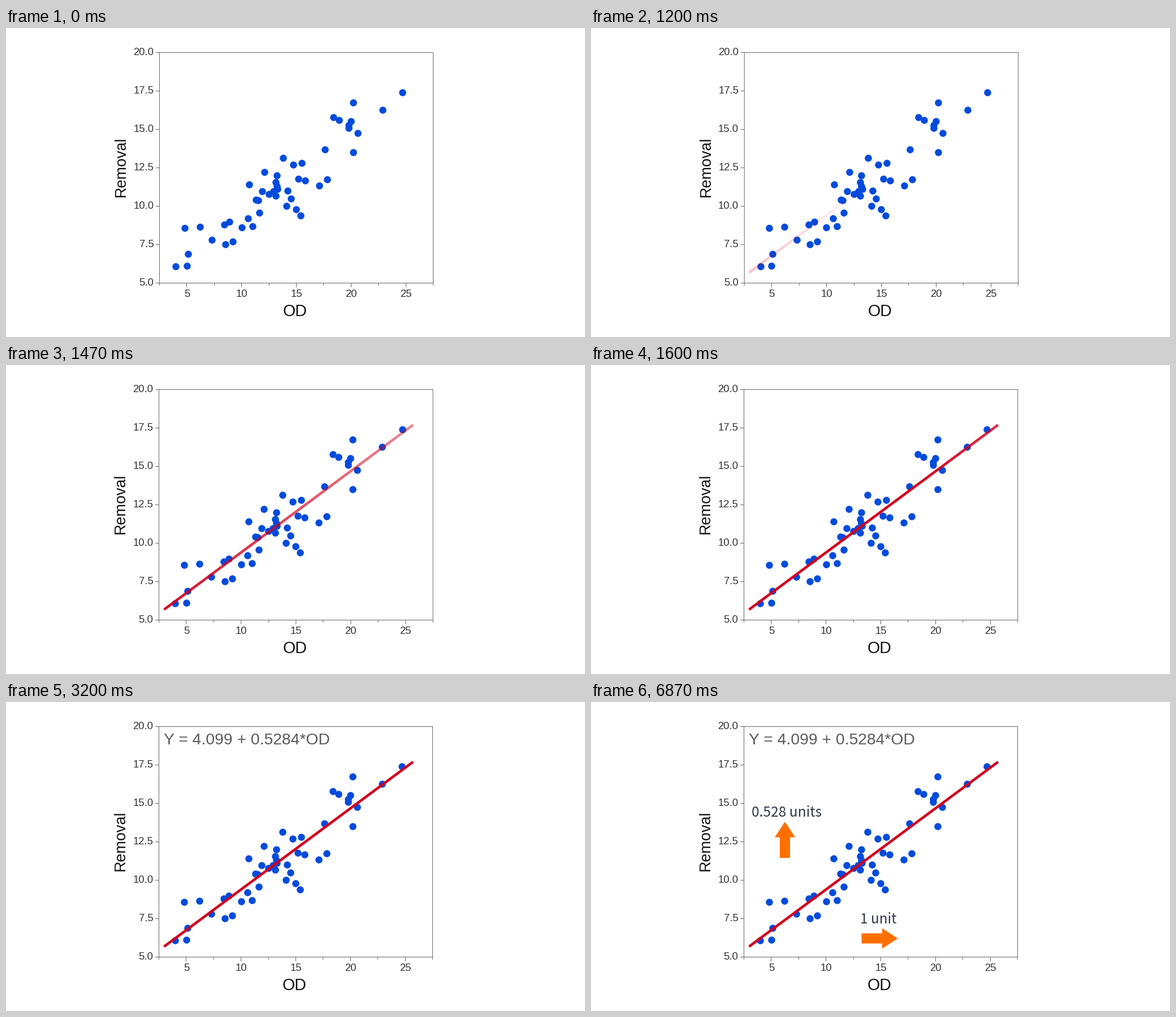
Write a matplotlib script that moves like this. It is 1024 by 547 pixels and loops after 8000 ms.

```python
import numpy as np
import matplotlib.pyplot as plt
from matplotlib.animation import FuncAnimation
from matplotlib.collections import LineCollection
from matplotlib.patches import Polygon

W, H, DPI = 1024, 547, 100
LOOP, STEP = 8000, 20
PT = 72 / DPI  # points per pixel

BLUE, RED, ORANGE = "#004bdc", "#d1021f", "#ff6f00"
LEFT, RIGHT, TOP, BOTTOM = 271.5, 755.5, 43.5, 451.5

# Dot centres in pixels
DOTS = np.array([
    (300, 421.5), (319.5, 421), (321.5, 399.5), (315.5, 353.5), (342.5, 352),
    (364, 374.5), (385.5, 348), (395, 342.5), (387.5, 382.5), (400.5, 378),
    (416.5, 352.5), (435.5, 351), (428, 336.5), (447.5, 326.5), (442, 304),
    (445.5, 304.5), (430, 277), (457, 254.5), (453, 289), (465, 293.5),
    (473, 288.5), (476.5, 297), (476.5, 273), (478.5, 280), (480, 285),
    (478.5, 260.5), (490, 230), (507.5, 242), (523, 239), (517, 267),
    (529, 269.5), (498, 288), (503.5, 301.5), (496, 315), (513, 320.5),
    (521, 332), (554, 278.5), (567.5, 268), (563.5, 215), (579, 157.5),
    (589, 163), (610, 165), (606, 172), (606, 176.5), (614, 132),
    (614, 219.5), (622, 186), (666, 145), (701, 114),
])

fig = plt.figure(figsize=(W / DPI, H / DPI), dpi=DPI, facecolor="white")
ax = fig.add_axes([0, 0, 1, 1])
ax.axis("off")


def px(value):
    return 271.5 + (value - 2.5) * 19.36


def py(value):
    return BOTTOM - (value - 5) * 27.2


def label(x, y, s, size, color="#333333", ha="center", font="Liberation Sans", **kw):
    return ax.text(x, y, s, fontsize=size * PT, color=color, ha=ha,
                   va="baseline", family=font, **kw)


# Plot box, ticks and labels
lines = [
    [(LEFT - 0.5, TOP), (RIGHT + 0.5, TOP)],
    [(LEFT - 0.5, BOTTOM), (RIGHT + 0.5, BOTTOM)],
    [(LEFT, TOP), (LEFT, BOTTOM)],
    [(RIGHT, TOP), (RIGHT, BOTTOM)],
]
texts = []
for k in range(7):
    value = 5 + 2.5 * k
    y = py(value)
    lines.append([(LEFT - 6.5, y), (LEFT, y)])
    texts.append(label(261.5, y + 5, f"{value:.1f}", 18.5, ha="right"))
for k in range(11):
    value = 2.5 + 2.5 * k
    x = np.floor(px(value)) + 0.5
    major = k % 2 == 1
    lines.append([(x, BOTTOM), (x, BOTTOM + (7.5 if major else 4.5))])
    if major:
        texts.append(label(px(value), 476, f"{value:.0f}", 18.5))
texts.append(label(511.5, 510, "OD", 28.5, "#111111"))
texts.append(label(211, 246, "Removal", 27, "#111111",
                   rotation=90, rotation_mode="anchor"))
text_x = [t.get_position()[0] for t in texts]

lines = np.array(lines, float)
box = LineCollection(lines, colors="#666666", linewidths=PT, snap=False)
ax.add_collection(box)
dots = ax.scatter(*DOTS.T, s=(12.5 * PT) ** 2, c=BLUE, linewidths=0, zorder=2)

# Fitted line: a solid bar, and a fading copy used while it wipes in
a, b = np.array([279.5, 433.0]), np.array([720.0, 106.0])
side = np.array([b[1] - a[1], a[0] - b[0]])
side *= 2.3 / np.hypot(*side)
corners = [a + side, b + side, b - side, a - side]
bar = ax.add_patch(Polygon(corners, fc=RED, lw=0, zorder=3))
mask = Polygon(corners, transform=ax.transData)
X0, X1, COLS = 276, 724, 112
cols = X0 + (np.arange(COLS) + 0.5) * (X1 - X0) / COLS
ramp = np.zeros((2, COLS, 4))
ramp[..., :3] = plt.matplotlib.colors.to_rgb(RED)
fade = ax.imshow(ramp, extent=(X0, X1, 436, 103), aspect="auto",
                 interpolation="bilinear", zorder=3)
fade.set_clip_path(mask)

# Callouts
equation = label(279, 75, "Y = 4.099 + 0.5284*OD", 28.3, "#5a5a5a", "left")
NOTE = dict(color="#2f3a4a", font="Noto Sans CJK JP", zorder=4)
ARROW = np.array([(-64, -9), (-27.5, -9), (-27.5, -18), (0, 0),
                  (-27.5, 18), (-27.5, 9), (-64, 9)])


def arrow(tip, shape):
    return ax.add_patch(Polygon(shape + tip, fc=ORANGE, lw=0, zorder=4))


run = [label(508.5, 392.5, "1 unit", 24.3, **NOTE), arrow((542.5, 418.5), ARROW)]
rise = [label(346.5, 203, "0.528 units", 24.5, **NOTE),
        arrow((343, 212), ARROW[:, ::-1] * (1, -1))]

ax.set_xlim(0, W)
ax.set_ylim(H, 0)


def reveal(x, t):
    """Opacity of the soft left-to-right wipe at column x."""
    tick = np.floor((t + 4 - 930) * 15 / 1000) / 15 * 1000
    front = -143 + 2.38 * tick
    return np.clip((front - x) / 880, 0, 1)


def draw(i):
    t = i * STEP + STEP / 2
    # The chart settles one pixel to the left as the wipe passes
    box.set_segments(np.stack([lines[..., 0] - reveal(lines[..., 0], t),
                               lines[..., 1]], axis=-1))
    x = DOTS[:, 0]
    dots.set_offsets(np.column_stack([x - reveal(x, t), DOTS[:, 1]]))
    for item, x in zip(texts, text_x):
        item.set_x(x - reveal(x, t))

    alpha = reveal(cols, t)
    done = alpha.min() >= 1
    bar.set_visible(done)
    fade.set_visible(not done and alpha.max() > 0)
    if fade.get_visible():
        ramp[..., 3] = alpha
        fade.set_data(ramp)

    equation.set_visible(t >= 3200)
    for item in run:
        item.set_visible(t >= 5200)
    for item in rise:
        item.set_visible(t >= 6870)
    return []


anim = FuncAnimation(fig, draw, frames=LOOP // STEP, interval=STEP,
                     init_func=lambda: draw(0), repeat=True, repeat_delay=0,
                     blit=False)
plt.show()
```
